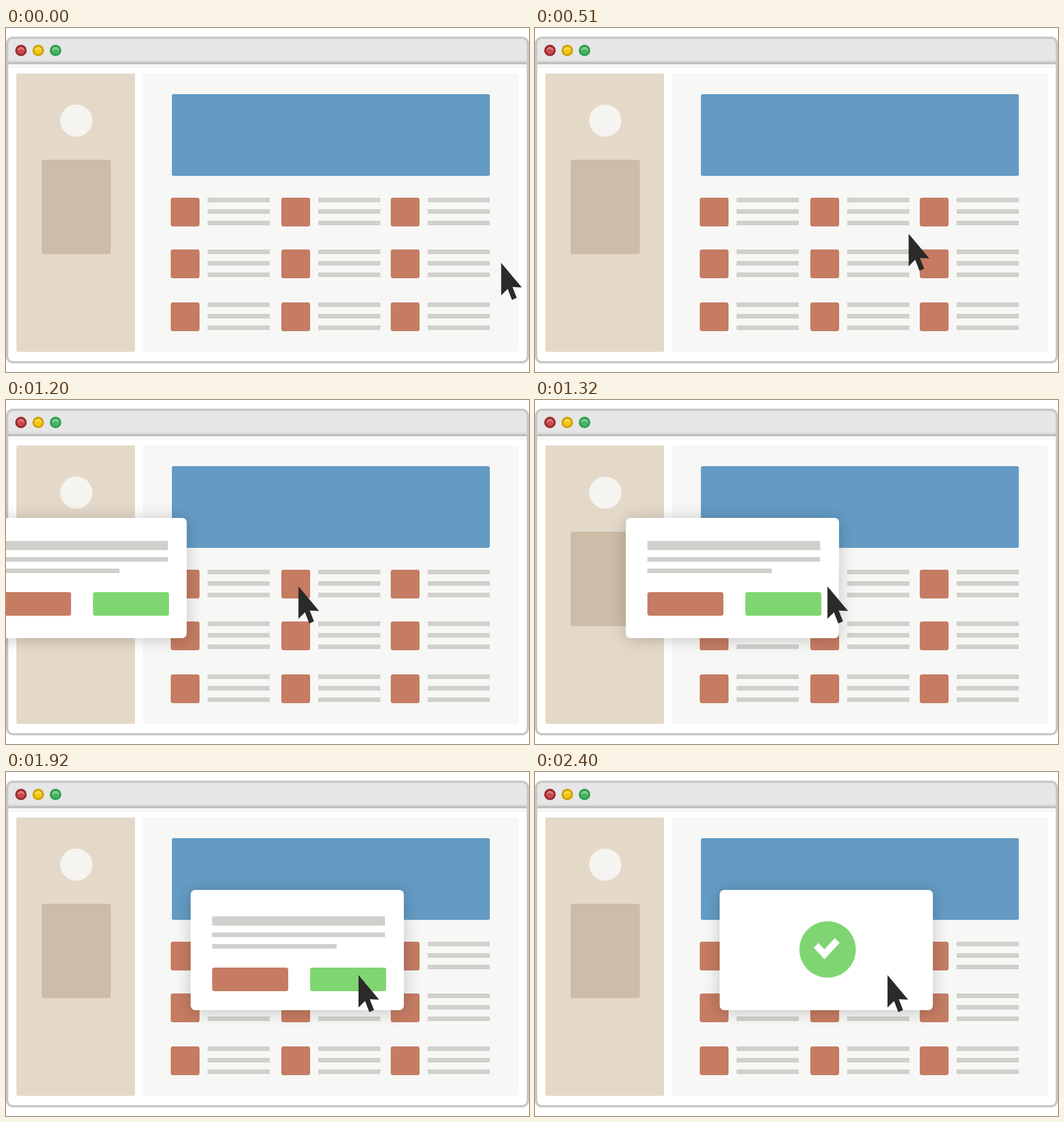
Animation of 908x598 px, one loop 2700 ms. Source, as an HTML page:

```html
<!DOCTYPE html>
<html lang="en">
<head>
<meta charset="utf-8">
<title>Dialog confirm</title>
<style>
  html, body { margin: 0; width: 100%; height: 100%; overflow: hidden; background: #fff; }
  svg { display: block; width: 908px; height: 598px; }
</style>
</head>
<body>
<svg viewBox="0 0 908 598" xmlns="http://www.w3.org/2000/svg">
  <defs>
    <filter id="shadow" filterUnits="userSpaceOnUse" x="-80" y="-80" width="530" height="370">
      <feDropShadow dx="0" dy="2" stdDeviation="14" flood-color="#000" flood-opacity=".22"/>
    </filter>
    <clipPath id="card"><rect width="370" height="209" rx="8"/></clipPath>
  </defs>

  <!-- window -->
  <rect x="2" y="17" width="904" height="564" rx="10" fill="#fff"/>
  <path d="M2 61V27a10 10 0 0 1 10-10H896a10 10 0 0 1 10 10V61Z" fill="#e6e6e6"/>
  <rect x="4" y="55" width="900" height="4" fill="#dfdfdf"/>
  <rect x="4" y="59" width="900" height="4" fill="#bfbfbf"/>
  <rect x="4" y="63" width="900" height="6" fill="#f7f7f5"/>
  <rect x="2" y="17" width="904" height="564" rx="10" fill="none" stroke="#c8c8c8" stroke-width="4"/>
  <g id="lights"></g>

  <!-- page -->
  <rect x="18" y="79" width="206" height="484" rx="3" fill="#e4d9c9"/>
  <circle cx="122" cy="161" r="28" fill="#f6f4f0"/>
  <rect x="62" y="229" width="120" height="164" rx="3" fill="#cdbca8"/>
  <rect x="238" y="79" width="652" height="484" rx="3" fill="#f7f7f5"/>
  <rect x="288" y="115" width="552" height="142" rx="3" fill="#649bc4"/>
  <g id="items"></g>

  <!-- dialog -->
  <g id="dialog">
    <rect width="370" height="209" rx="8" fill="#fff" filter="url(#shadow)"/>
    <g clip-path="url(#card)">
      <g id="content" transform="translate(0 0)">
        <g fill="#d0d0cd">
          <rect x="37.3" y="40" width="300" height="16"/>
          <rect x="37.3" y="68" width="300" height="8"/>
          <rect x="37.3" y="88" width="216" height="8"/>
        </g>
        <rect x="37.3" y="129" width="132" height="41" rx="4" fill="#c57c62"/>
        <rect x="207.3" y="129" width="132" height="41" rx="4" fill="#80d573"/>
        <g transform="translate(187.3 -71.5)">
          <circle r="49" fill="#80d573"/>
          <path d="M-24-3L-15.8-11.2L-5.5-.3L12.5-19.7L21-11.5L-5.5 17Z" fill="#fff"/>
        </g>
      </g>
    </g>
  </g>

  <path id="cursor" d="M0 0V56.5L11.3 45.2L18.8 64.5L27 60.8L19.6 42L35.8 42.8Z" fill="#2b2a28"/>
</svg>
<script>
  const $ = id => document.getElementById(id);
  const STEP = 30, LOOP = 2700;

  function add(parent, tag, attrs) {
    const el = document.createElementNS('http://www.w3.org/2000/svg', tag);
    for (const k in attrs) el.setAttribute(k, attrs[k]);
    parent.append(el);
  }

  // ring, body and highlight of each window button
  [['#9c2b2e', '#c94a4e', '#d97679'],
   ['#cfa300', '#f7c50c', '#fad952'],
   ['#2f9e50', '#43b463', '#7fcd94']].forEach(([ring, body, shine], i) => {
    const cx = 26 + 30 * i, g = $('lights');
    add(g, 'circle', { cx, cy: 39, r: 10, fill: ring });
    add(g, 'circle', { cx, cy: 39, r: 6.2, fill: shine });
    add(g, 'ellipse', { cx, cy: 41, rx: 5.6, ry: 3.9, fill: body });
  });

  for (const y of [295, 385, 477]) {
    for (const x of [286, 478, 668]) {
      add($('items'), 'rect', { x, y, width: 50, height: 50, rx: 4, fill: '#c57c62' });
      for (const dy of [0, 20, 40]) {
        add($('items'), 'rect', { x: x + 64, y: y + dy, width: 108, height: 8, fill: '#d0d0cd' });
      }
    }
  }

  // eased progress between two steps
  function ease(n, from, to) {
    const p = Math.min(1, Math.max(0, (n - from) / (to - from)));
    return p * p * (3 - 2 * p);
  }

  const move = (id, x, y) => $(id).setAttribute('transform', `translate(${x} ${y})`);

  function draw(ms) {
    const n = Math.floor((ms % LOOP) / STEP);
    const a = ease(n, 0, 30), b = ease(n, 50, 62);
    move('cursor', 859.7 - 352 * a + 104.3 * b, 408.2 - 84.3 * a + 29 * b);
    move('dialog', -433.3 + 754 * ease(n, 30, 50), 205);
    move('content', 0, 175 * ease(n, 62, 80));
  }

  const start = performance.now();
  function tick() {
    draw(performance.now() - start);
    requestAnimationFrame(tick);
  }
  tick();
</script>
</body>
</html>
```
